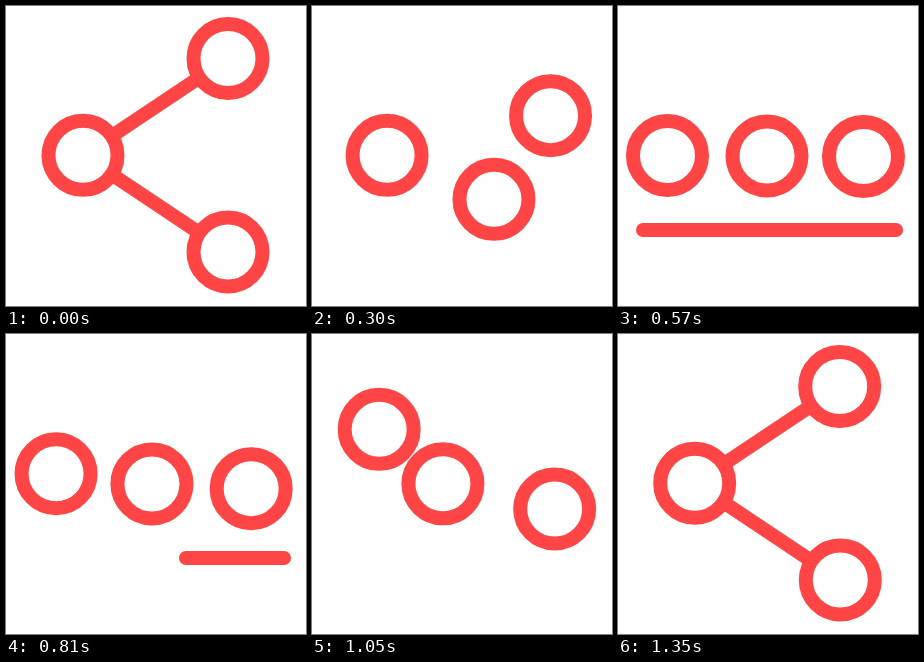
Recreate the animation shown at these times as an HTML page. Size 300 by 300 pixels, loop 1.5 s.

```html
<!DOCTYPE html>
<html lang="en">
<head>
<meta charset="utf-8">
<title>Share loop</title>
<style>
  :root { --red: #ff4545; --bg: #fefefe; }
  html, body { margin: 0; width: 100%; height: 100%; overflow: hidden; background: var(--bg); }
  .stage { position: relative; width: 300px; height: 300px; overflow: hidden; }
  svg { position: absolute; inset: 0; }

  .link {
    stroke: var(--red);
    stroke-width: 14;
    stroke-dasharray: 1 2;
    animation: link 1500ms infinite;
  }

  .ring {
    position: absolute;
    left: 0;
    top: 0;
    box-sizing: border-box;
    width: 83px;
    height: 83px;
    border: 14px solid var(--red);
    border-radius: 50%;
    background: var(--bg);
    offset-rotate: 0deg;
    offset-anchor: 50% 50%;
    animation: travel 1500ms infinite;
  }
  .hub {
    --in: path("M77 149.3 L49.5 149.5");
    --out: path("M49.5 149.5 C49.5 84 128 16 221.7 52.5");
    animation-name: travel-late;
  }
  .top {
    --in: path("M222 52.5 Q241.4 109.7 245.5 150.5");
    --out: path("M245.5 150.5 Q242 199 222.3 246");
    animation-name: travel-early;
  }
  .low {
    --in: path("M222 246 L149 150");
    --out: path("M149 150 L76.7 149.2");
  }

  .bar {
    position: absolute;
    top: 217px;
    left: 17.5px;
    right: 15px;
    height: 13.5px;
    border-radius: 7px;
    background: var(--red);
    animation: bar 1500ms infinite;
  }

  /* Two legs per loop: into the row, then back into the icon. */
  @keyframes travel {
    0% { offset-path: var(--in); offset-distance: 0%; animation-timing-function: ease-in-out; }
    38% { offset-path: var(--in); offset-distance: 100%; animation-timing-function: step-end; }
    38.001% { offset-path: var(--out); offset-distance: 0%; animation-timing-function: cubic-bezier(.98, 0, .68, 1); }
    90%, 100% { offset-path: var(--out); offset-distance: 100%; }
  }
  @keyframes travel-early {
    0% { offset-path: var(--in); offset-distance: 0%; animation-timing-function: ease-in-out; }
    36.4% { offset-path: var(--in); offset-distance: 100%; }
    38% { offset-path: var(--in); offset-distance: 100%; animation-timing-function: step-end; }
    38.001% { offset-path: var(--out); offset-distance: 0%; animation-timing-function: cubic-bezier(.98, 0, .68, 1); }
    90%, 100% { offset-path: var(--out); offset-distance: 100%; }
  }
  @keyframes travel-late {
    0% { offset-path: var(--in); offset-distance: 0%; }
    16% { offset-path: var(--in); offset-distance: 0%; animation-timing-function: ease-in-out; }
    38% { offset-path: var(--in); offset-distance: 100%; animation-timing-function: step-end; }
    38.001% { offset-path: var(--out); offset-distance: 0%; animation-timing-function: cubic-bezier(.98, 0, .68, 1); }
    90%, 100% { offset-path: var(--out); offset-distance: 100%; }
  }
  @keyframes link {
    0% { stroke-dashoffset: 0; animation-timing-function: ease-in-out; }
    16%, 78.5% { stroke-dashoffset: 1; animation-timing-function: ease-in-out; }
    90%, 100% { stroke-dashoffset: 0; }
  }
  @keyframes bar {
    0%, 21% { left: 17.5px; right: 282.5px; animation-timing-function: ease-in-out; }
    38% { left: 17.5px; right: 15px; animation-timing-function: ease-in-out; }
    67.3%, 100% { left: 285px; right: 15px; }
  }
</style>
</head>
<body>
<div class="stage">
  <svg width="300" height="300" viewBox="0 0 300 300" fill="none">
    <path class="link" pathLength="1" d="M77 149.3 L222 52.5"/>
    <path class="link" pathLength="1" d="M77 149.3 L222 246"/>
  </svg>
  <div class="bar"></div>
  <div class="ring hub"></div>
  <div class="ring top"></div>
  <div class="ring low"></div>
</div>
</body>
</html>
```
